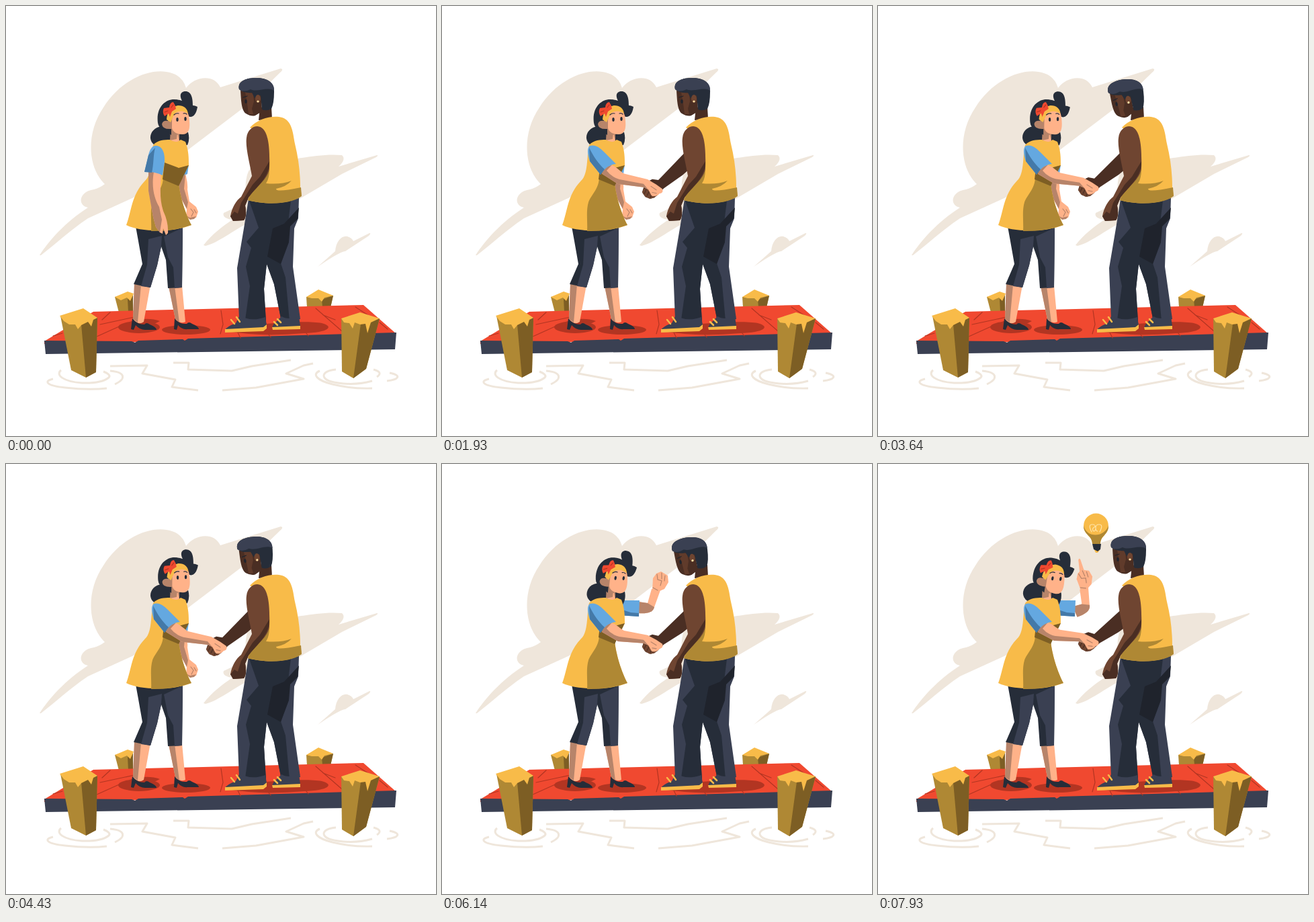
These frames come from a looping animation (640 by 640 pixels, 8 s). An HTML page:

```html
<!DOCTYPE html>
<html lang="en">
<head>
<meta charset="utf-8">
<title>Handshake on the dock</title>
<style>
html, body { margin: 0; width: 100%; height: 100%; overflow: hidden; background: #fff; }
svg { display: block; width: 100vw; height: 100vh; }
.sand { fill: #efe6db; }
.ripple { fill: none; stroke: #efe6db; stroke-width: 3; stroke-linejoin: round; }
.yellow { fill: #f8bb49; }
.ochre { fill: #af8834; }
.olive { fill: #7d5e24; }
.red { fill: #f04930; }
.wine { fill: #b23522; }
.slate { fill: #3a4052; }
.navy { fill: #262d39; }
.ink { fill: #1f232c; }
.skin { fill: #ffb289; }
.tan { fill: #b7846a; }
.brown { fill: #6f4531; }
.umber { fill: #4a2e23; }
.blue { fill: #64a8e0; }
.denim { fill: #4479a8; }
.line { fill: none; stroke-width: 1.2; stroke-linecap: round; }
</style>
</head>
<body>
<svg viewBox="0 0 640 640">
  <g class="sand">
    <path d="M50 371C64 349 88 322 122 300C106 297 108 276 131 273Q139 271 147 265C121 240 119 189 145 151C172 108 218 90 247 100Q263 105 268 122C281 104 310 101 319 121L409 93Q414 94 408 99L358 148L271 214L190 285L122 316C94 335 74 354 52 371Z"/>
    <path d="M294 356C305 341 322 328 337 318Q321 316 324 308L358 292C354 264 356 232 385 230C410 235 460 218 500 222C506 227 500 235 495 239L552 222Q555 222 551 225L500 250L437 287L360 323C340 333 315 353 297 357Z"/>
    <path d="M464 388L490 365C491 350 500 341 508 343Q515 345 517 350L541 338Q544 338 540 342L505 365Q496 366 464 388Z"/>
  </g>
  <g class="ripple">
    <path d="M155 536L210 535L203 547L252 556L247 567L286 572M249 531L272 531L271 541L336 543L366 536L424 527M322 572L372 568L443 555L417 547L443 535L457 532"/>
    <path d="M82 542C73 549 85 559 113 561Q142 562 153 553Q157 549 145 544M70 555C56 558 59 565 88 568Q123 572 150 569M155 543C178 545 179 555 162 563"/>
    <path d="M491 541C468 543 465 557 494 561Q520 565 545 558M467 543C455 548 462 557 486 563Q515 570 545 569M547 541Q562 545 552 552M571 546C590 550 584 556 567 558"/>
  </g>

  <path class="ochre" d="M162 433L189 428V456H168Z"/>
  <path class="olive" d="M181 436L189 430V456H182Z"/>
  <path class="yellow" d="M162 433L181 425L190 428L185 439L180 434L171 438Z"/>
  <path class="ochre" d="M447 433L487 431L483 449H448Z"/>
  <path class="olive" d="M470 437L487 431L483 448H471Z"/>
  <path class="yellow" d="M447 433L465 422L487 431L474 434L470 440L465 435L455 435Z"/>

  <path class="red" d="M57 499L130 455L532 445L581 488L350 497L57 503Z"/>
  <path class="slate" d="M57 498L187 499L192 501L197 498L263 496L266 498L271 495L581 486L579 511L59 518Z"/>
  <path class="line" stroke="#b23522" d="M320 453L323 474L319 488M140 474L205 460M135 492L175 474M345 486L349 494M387 484L394 493M443 482L450 491M461 450L507 490M472 460L490 467M520 448L540 461M424 456L437 462M155 456L143 467M70 491L84 487M556 471L568 481"/>
  <g class="wine">
    <ellipse cx="198" cy="478" rx="31" ry="9"/>
    <ellipse cx="268" cy="482" rx="36" ry="7"/>
    <path d="M184 470Q210 462 229 469L215 476Z"/>
    <path d="M330 484C350 474 440 467 470 472C489 477 481 486 443 487Q380 493 330 484Z"/>
  </g>

  <path class="ochre" d="M81 461L136 464L134 545L119 553L97 542Z"/>
  <path class="olive" d="M112 474L136 464L134 545L119 553Z"/>
  <path class="yellow" d="M80 461L115 450L136 464L130 467L127 477L122 470L112 475L107 481L103 474L94 474L86 469Z"/>
  <path class="ochre" d="M499 465L556 465L536 540L517 554L500 544Z"/>
  <path class="olive" d="M528 473L556 465L536 540L517 554Z"/>
  <path class="yellow" d="M499 465L527 456L556 465L543 471L538 487L535 473L527 474L519 471L516 480L511 472L503 471Z"/>

  <!-- man -->
  <g id="manReach">
    <path class="umber" d="M374 207L361 218L322 256L313 254L304 258L300 266L298 272L303 280L311 283L320 279L330 269L358 251L374 238Z"/>
    <path class="brown" d="M300 267L309 269L322 277L316 282L309 283L302 279L298 273Z"/>
    <path class="line" stroke="#4a2e23" d="M304 269L301 275M309 271L305 278M314 274L310 281"/>
  </g>
  <path class="slate" d="M361 287Q400 294 436 286L435 316L429 331L427 388L438 466L410 470L399 414L388 384L384 421L387 470L347 467L344 390L354 331Z"/>
  <path class="navy" d="M361 287Q400 296 424 290L419 330L421 352L409 383L416 404L422 469L410 470L399 414L388 384L384 421L387 470L356 467L363 417L357 388L365 360L358 351L376 330Z"/>
  <path class="ink" d="M436 300L434 317L423 328L421 351L409 384L389 373L397 331L414 324Z"/>
  <path class="slate" d="M348 460Q363 471 386 463L388 475L383 481L326 482Q329 477 342 472ZM410 462Q420 468 436 462L438 477L396 479L398 474Z"/>
  <path class="yellow" d="M326 481L383 478L388 474V480L383 484L326 486Z"/>
  <path class="yellow" d="M396 478L438 476V481L397 482Z"/>
  <path class="line" style="stroke-width:2.5" stroke="#f8bb49" d="M335 467L340 473M343 463L348 470M399 470L404 475M404 466L409 471"/>
  <path class="umber" d="M378 151L395 150L396 168L376 170Z"/>
  <path class="yellow" d="M363 181C375 167 398 162 411 166C426 171 427 189 430 205Q438 238 438 270L440 282C421 297 382 295 360 289L366 266L389 245V195Z"/>
  <path class="ochre" d="M391 232Q394 254 387 264Q410 266 425 260Q417 269 402 272Q401 278 439 270L440 283C421 297 382 295 360 289L370 266Z"/>
  <path class="brown" d="M374 179C391 180 393 210 392 242C390 258 371 270 361 285L356 297Q359 312 354 319L338 320L334 313C336 300 343 289 350 284L366 253C363 235 356 210 358 196C359 185 367 179 374 179Z"/>
  <path class="umber" d="M392 231C393 256 371 270 361 285L356 297Q359 312 354 319L338 320L334 313L340 306L345 309L350 293L367 266L378 254Z"/>
  <g id="manHead">
    <path class="umber" d="M349 126L380 130L381 157L371 163Q365 165 357 160C350 155 350 139 349 126Z"/>
    <path class="brown" d="M356 128L368 130L369 142L366 153L368 161L361 161L359 145Z" opacity=".6"/>
    <path class="navy" d="M347 124C344 111 359 107 372 107C389 107 400 114 399 128Q399 145 395 153Q388 157 381 154L379 133L370 137L366 129Q353 130 347 124Z"/>
    <path class="slate" d="M347 124C344 111 359 107 372 107C389 107 400 114 399 126C390 119 374 129 364 124Q354 129 347 124Z"/>
    <ellipse class="brown" cx="375" cy="138" rx="4" ry="6"/>
    <circle cx="375" cy="142" r="1.6" fill="#ffe3a6"/>
    <ellipse class="ink" cx="357" cy="142" rx="1.7" ry="3"/>
    <path class="line" stroke="#1f232c" d="M353 136L359 134"/>
  </g>

  <!-- woman -->
  <g id="restArm">
    <path class="blue" d="M264 238L272 236L270 250L262 254Z"/>
    <path class="skin" d="M256 264L267 250Q271 264 270 273L273 291L283 299L286 306L283 315L274 318L268 313L269 302L261 287Z"/>
    <path class="tan" d="M256 264L267 250L265 272L271 292L269 302L261 287ZM268 312L274 315L283 313L280 317L274 318Z"/>
    <path class="line" stroke="#b7846a" d="M275 302L279 307L276 313M280 303L283 308"/>
  </g>
  <g id="liftArm">
    <g id="liftFore">
      <path class="skin" d="M292 205L306 207L312 186L325 188L316 213C314 222 303 223 292 222Z"/>
      <path class="tan" d="M292 205L306 207L316 213C314 222 303 223 292 222Z"/>
      <path id="finger" class="skin" d="M321 167L328 145Q331 142 331 146L329 168Z"/>
      <path class="skin" d="M313 188L314 170L319 163L326 160L336 166L337 176L331 186L324 189Z"/>
      <path class="line" stroke="#b7846a" d="M320 164L321 172L327 174L325 181M327 162L327 171M332 166L331 174M314 184L321 188"/>
    </g>
    <path class="blue" d="M256 203L294 203L293 227L262 225Z"/>
    <path class="denim" d="M262 215L281 221L293 222V227L262 225Z"/>
  </g>

  <path class="skin" d="M191 414L215 415L205 470Q197 476 189 466ZM242 417L262 416L267 470Q259 474 252 466Z"/>
  <path class="tan" d="M191 414L201 415L196 471L189 466ZM242 417L251 417L258 471L252 466Z"/>
  <g class="navy">
    <path d="M188 465L186 481L190 482L193 475Q199 482 207 482H224Q224 478 214 474Q209 470 206 474Q195 474 188 465Z"/>
    <path d="M251 465L250 481L254 482L256 475Q262 482 270 481H287Q287 477 277 473Q272 469 269 473Q258 474 251 465Z"/>
    <path d="M193 328L263 327L262 419L241 420L238 378L231 358L225 386L215 419L190 414L203 384L197 350Z"/>
  </g>
  <path class="slate" d="M212 347L232 342L231 358L225 386L215 419L201 417L210 385ZM235 343L263 330L262 419L251 420L249 389L241 374Z"/>

  <g class="herHead">
    <path class="navy" d="M232 179C214 181 209 201 223 208L270 207Q274 198 271 188Z"/>
  </g>
  <path class="tan" d="M245 180L258 188V202Q251 208 244 200Z"/>
  <path class="skin" d="M255 188L258 202Q251 206 244 200L254 198Z"/>
  <path class="yellow" d="M219 207C226 199 236 199 244 199Q253 205 260 199L267 202C272 215 272 226 272 237L257 264C260 290 270 315 276 326C250 337 200 337 179 326C187 306 186 282 207 260C218 250 215 225 219 207Z"/>
  <path class="ochre" d="M234 256L257 264C260 290 270 315 276 326Q247 336 216 335C217 322 214 306 218 292C222 281 233 273 234 256Z"/>
  <path class="olive" d="M236 233L257 241L272 237L257 268L233 258Z"/>
  <g class="herHead">
    <path class="navy" d="M226 174C223 151 237 139 250 139Q258 139 262 141C257 132 261 127 267 127C276 127 278 137 278 148Q281 148 285 150C283 163 277 167 271 164L246 192L233 183Q227 181 226 174Z"/>
    <path class="tan" d="M241 163L257 160L257 191L246 193L246 183Q233 184 232 176Q233 170 241 171Z"/>
    <path class="skin" d="M247 170Q248 155 260 154Q271 155 272 163C275 181 273 191 263 191Q250 191 247 182Z"/>
    <path class="yellow" d="M239 169Q240 151 256 148Q269 148 271 160Q260 153 251 160L245 173Z"/>
    <g class="red">
      <path d="M243 151L235 152Q232 158 236 164L242 160L244 165L247 157L253 153Q252 147 249 143Q244 143 243 151Z"/>
      <path class="line" stroke="#b23522" d="M236 158L241 156M246 151L249 147"/>
    </g>
    <g class="navy">
      <ellipse cx="255" cy="169" rx="1.7" ry="3"/>
      <ellipse cx="267" cy="168" rx="1.7" ry="3"/>
    </g>
    <path class="line" stroke="#262d39" d="M250 162Q253 159 257 160M264 160Q267 159 269 161"/>
  </g>

  <g id="hangArm">
    <path class="skin" d="M212 244L231 247C230 270 228 286 234 305Q242 322 241 338L238 341L234 331L233 339L229 337L223 329L219 314L212 275Z"/>
    <path class="tan" d="M212 244L220 247C216 270 221 287 228 299L232 318L229 337L223 329L219 314L212 275Z"/>
  </g>
  <g id="openArm">
    <path class="skin" d="M252 236Q260 245 268 249L299 262C309 268 315 280 320 294L317 297L310 287L314 297L310 298L303 287L307 296L304 297L295 277L262 267L238 250Q241 239 252 236Z"/>
    <path class="tan" d="M238 250Q241 239 252 236L245 245Q251 254 264 258L295 270L304 281L307 296L304 297L295 277L262 267Z"/>
  </g>
  <g id="claspArm">
    <path class="skin" d="M252 236C259 238 265 245 271 248L306 255L319 262L328 268Q330 274 324 275Q319 281 312 279L307 270L300 267L262 264L238 250Q241 239 252 236Z"/>
    <path class="tan" d="M238 250Q241 239 253 236L245 245Q252 254 264 257L300 262L307 270L300 267L262 264Z"/>
    <path class="line" stroke="#b7846a" d="M311 265L319 270M313 274L319 275"/>
  </g>
  <path id="sleeve" class="blue"/>
  <path id="cuff" class="denim"/>

  <g id="bulb">
    <path class="yellow" d="M306 92A18.5 18.5 0 1 1 343 92C343 106 331 106 331 119H319C319 106 306 106 306 92Z"/>
    <path class="ochre" d="M306 92C311 111 337 109 343 92C343 106 331 106 331 119H319C319 106 306 106 306 92Z"/>
    <path class="line" stroke="#ffe3a6" d="M318 101Q312 90 319 90C326 90 325 100 321 100Q317 97 323 93M330 101Q336 90 329 90C322 90 323 100 327 100"/>
    <path class="yellow" d="M322 128H330L327 132H324Z"/>
    <path class="navy" d="M319 119H332L331 127L327 130L321 127Z"/>
  </g>
</svg>
<script>
const LOOP = 8000, SHAKE = 825;
const el = id => document.getElementById(id);
const clamp = x => Math.min(1, Math.max(0, x));
const ease = x => x * x * (3 - 2 * x);
const ramp = (t, a, b) => ease(clamp((t - a) / (b - a)));

// Eased value through a list of [time, value] stops.
function track(t, stops) {
  const i = stops.findIndex(s => s[0] > t);
  if (i < 0) return stops[stops.length - 1][1];
  if (i === 0) return stops[0][1];
  const [a, u] = stops[i - 1], [b, v] = stops[i];
  return u + (v - u) * ramp(t, a, b);
}

// Blend two paths that share the same commands.
function blend(from, to, k) {
  const goal = to.match(/[\d.]+/g);
  let i = 0;
  return from.replace(/[\d.]+/g, n => +n + (goal[i++] - n) * k);
}

const sleeveDown = "M222 208C232 207 237 218 236 232L233 252C225 248 215 246 206 247L212 222C214 213 218 208 222 208Z";
const sleeveOut = "M220 208C230 205 238 214 243 219L259 235C250 236 242 241 236 251L220 231C217 222 215 212 220 208Z";
const cuffDown = "M222 211C219 222 220 235 217 248L206 247L212 222Z";
const cuffOut = "M219 211C226 225 233 235 242 243L236 251L220 231Z";

const show = (id, on) => el(id).setAttribute("display", on ? "inline" : "none");
const move = (node, value) => node.setAttribute("transform", value);
const turn = (deg, x, y) => `rotate(${deg} ${x} ${y})`;
const grow = (sx, sy, x, y) => `translate(${x} ${y}) scale(${sx} ${sy}) translate(${-x} ${-y})`;
// Vertical shear that leaves the column x0 in place.
const shear = (k, x0) => `matrix(1 ${k} 0 1 0 ${-k * x0})`;

const manNod = [[2300, 0], [2580, .5], [2860, 0], [3600, -7], [4430, -4], [5070, 0], [5300, .5], [6140, -7], [6900, -5], [7600, 0]];
const herTilt = [[2300, 0], [2860, 1], [5070, 1], [6140, 6], [7000, 8], [7930, 9]];
const glowUp = [[7150, 0], [7430, .83], [7800, 1]];
const heads = document.querySelectorAll(".herHead");

function draw(t) {
  const bob = 3 - 6.5 * Math.cos((t - 7930) / SHAKE * 2 * Math.PI);
  const sway = bob * ramp(t, 1600, 2000);

  const reach = ramp(t, 640, 1210);
  show("hangArm", t < 660);
  show("openArm", t >= 660 && t < 1640);
  show("claspArm", t >= 1640);
  el("sleeve").setAttribute("d", blend(sleeveDown, sleeveOut, reach));
  el("cuff").setAttribute("d", blend(cuffDown, cuffOut, reach));
  const drop = 58 * (1 - reach) - 8 * ramp(t, 1350, 1640);
  move(el("openArm"), `translate(${-20 * (1 - reach)} ${6 * (1 - reach)}) ` + turn(drop, 243, 243));
  move(el("claspArm"), shear(sway / 72, 243));

  show("manReach", t > 1260);
  move(el("manReach"), shear(-sway / 53, 368) + turn(-30 * (1 - ramp(t, 1260, 1720)), 372, 222));

  move(el("manHead"), turn(track(t, manNod), 388, 160));
  const tilt = turn(track(t, herTilt), 250, 200);
  heads.forEach(head => move(head, tilt));

  const lift = ramp(t, 5130, 5720);
  show("restArm", t < 5150);
  show("liftArm", t >= 5150);
  move(el("liftArm"), turn(75 * (1 - lift), 262, 212));
  move(el("liftFore"), turn(66 * (1 - lift) - 24 * ramp(t, 6600, 7200), 308, 214));
  move(el("finger"), grow(1, ramp(t, 6850, 7150), 325, 168));

  const glow = track(t, glowUp);
  show("bulb", glow > 0);
  move(el("bulb"), grow(glow, glow, 325, 131));
}

const start = performance.now();
function frame() {
  draw((performance.now() - start) % LOOP);
  requestAnimationFrame(frame);
}
frame();
</script>
</body>
</html>
```
